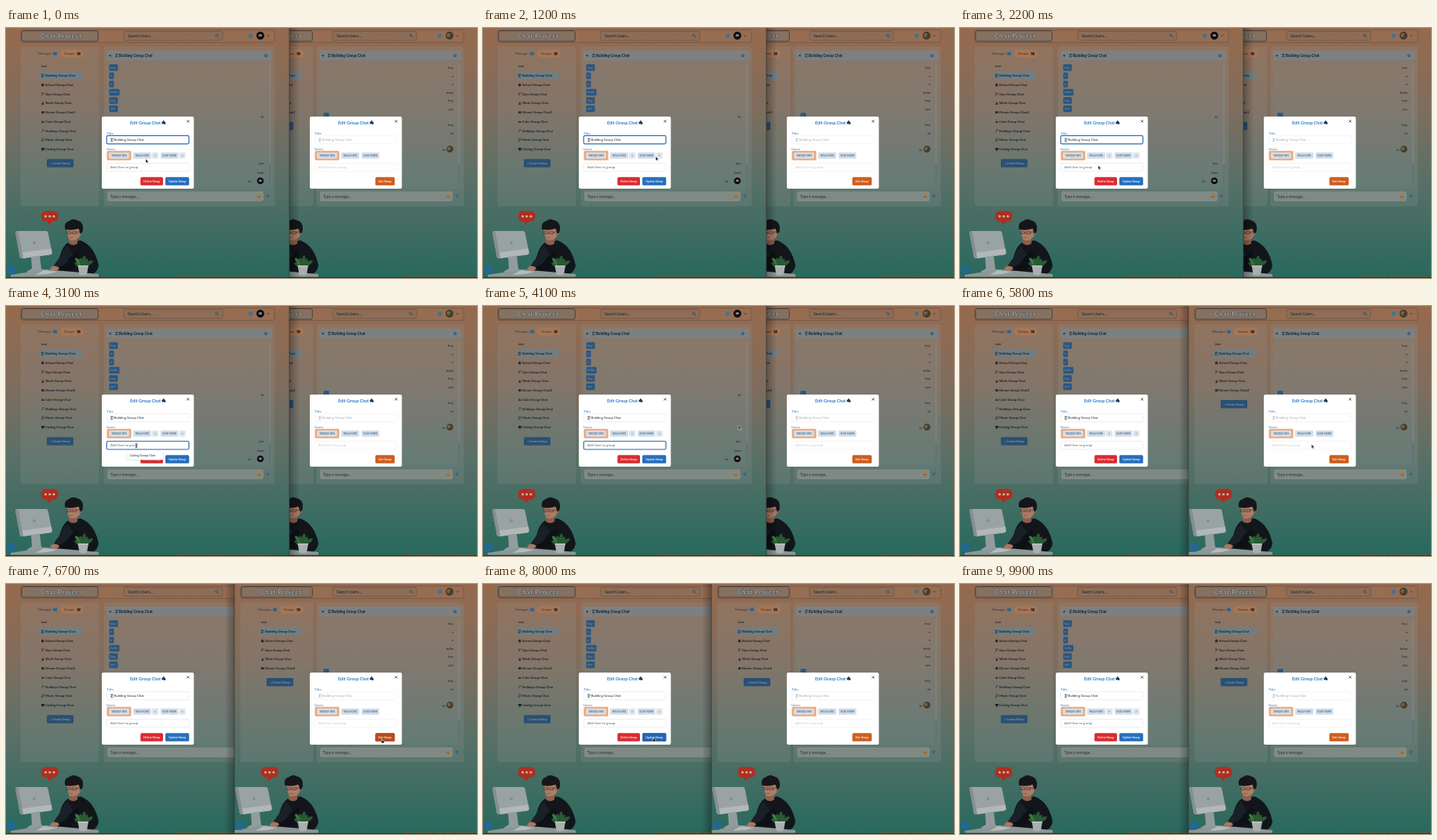
An HTML page that plays this animation: 600 px wide and 319 px high, repeating every 10 s.

```html
<!DOCTYPE html>
<html lang="en">
<head>
<meta charset="utf-8">
<title>Group chat demo</title>
<style>
html, body { margin: 0; width: 100%; height: 100%; overflow: hidden; background: #2b6a5c; }
#stage { position: relative; width: 600px; height: 319px; overflow: hidden; }
#stage > * { position: absolute; inset: 0; }
svg { display: block; width: 600px; height: 319px; }
text { font-family: Lato, "Open Sans", sans-serif; fill: #17212c; }
.b { font-weight: 700; }
.m { text-anchor: middle; }
.e { text-anchor: end; }

#right { clip-path: inset(0 0 0 361px); animation: front 10s step-end infinite; }
@keyframes front { 42% { clip-path: inset(0 0 0 291px); } }

.before, .after, .titleFocus, .addFocus, .popup, .exitHover, .updateHover,
.arrow, .beam, .hand, .denied { animation: 10s step-end infinite; }
.before { animation-name: before; }
.after { opacity: 0; animation-name: after; }
.titleFocus { animation-name: titleFocus; }
.addFocus, .popup { opacity: 0; animation-name: addFocus; }
.popup { animation-name: popup; }
.exitHover { opacity: 0; animation-name: exitHover; }
.updateHover { opacity: 0; animation-name: updateHover; }
.arrow { animation-name: arrow; }
.beam { opacity: 0; animation-name: beam; }
.hand { opacity: 0; animation-name: hand; }
.denied { opacity: 0; animation-name: denied; }
@keyframes before { 0% { opacity: 1; } 42%, 100% { opacity: 0; } }
@keyframes after { 0% { opacity: 0; } 42%, 100% { opacity: 1; } }
@keyframes titleFocus { 0% { opacity: 1; } 25%, 100% { opacity: 0; } }
@keyframes addFocus { 0% { opacity: 0; } 25% { opacity: 1; } 42%, 100% { opacity: 0; } }
@keyframes popup { 0% { opacity: 0; } 27% { opacity: 1; } 36%, 100% { opacity: 0; } }
@keyframes exitHover { 0% { opacity: 0; } 63% { opacity: 1; } 71%, 100% { opacity: 0; } }
@keyframes updateHover { 0% { opacity: 0; } 77% { opacity: 1; } 86%, 100% { opacity: 0; } }
@keyframes arrow {
  0% { opacity: 1; } 24% { opacity: 0; } 34% { opacity: 1; } 46% { opacity: 0; }
  52% { opacity: 1; } 63% { opacity: 0; } 71% { opacity: 1; } 77% { opacity: 0; }
  86% { opacity: 1; } 90%, 100% { opacity: 0; }
}
@keyframes beam { 0% { opacity: 0; } 24% { opacity: 1; } 34%, 100% { opacity: 0; } }
@keyframes denied { 0% { opacity: 0; } 46% { opacity: 1; } 52%, 100% { opacity: 0; } }
@keyframes hand {
  0% { opacity: 0; } 63% { opacity: 1; } 71% { opacity: 0; }
  77% { opacity: 1; } 86%, 100% { opacity: 0; }
}

#cursor { animation: travel 10s ease-in-out infinite; }
@keyframes travel {
  0%, 3% { transform: translate(178px, 167px); }
  10%, 15% { transform: translate(220px, 164px); }
  25%, 33% { transform: translate(166px, 178px); }
  46%, 50% { transform: translate(396px, 141px); }
  64%, 69% { transform: translate(479px, 198px); }
  78%, 84% { transform: translate(217px, 196px); }
  90%, 100% { transform: translate(222px, 222px); }
}
</style>
</head>
<body>
<div id="stage">
  <div id="left"></div>
  <div id="right"></div>
  <svg id="overlay" viewBox="0 0 600 319"></svg>
</div>
<script>
const rect = (x, y, w, h, fill, r = 0, more = '') =>
  `<rect x="${x}" y="${y}" width="${w}" height="${h}" rx="${r}" fill="${fill}" ${more}/>`;
const dot = (x, y, r, fill) => `<circle cx="${x}" cy="${y}" r="${r}" fill="${fill}"/>`;
const path = (d, fill, more = '') => `<path d="${d}" fill="${fill}" ${more}/>`;
const line = (d, color, w = .6) =>
  path(d, 'none', `stroke="${color}" stroke-width="${w}" stroke-linecap="round"`);
const text = (x, y, size, str, cls = '', fill = '') =>
  `<text x="${x}" y="${y}" font-size="${size}" class="${cls}"${fill && ` style="fill:${fill}"`}>${str}</text>`;
const group = (cls, ...parts) => `<g class="${cls}">${parts.join('')}</g>`;
const cross = (x, y, s, color, w) =>
  line(`M${x - s} ${y - s}l${2 * s} ${2 * s}m0 ${-2 * s}l${-2 * s} ${2 * s}`, color, w);

const crane = (x, y, color) =>
  line(`M${x} ${y + 1.7}h2.800M${x + .8} ${y + 1.7}v-3.400h2v1.600M${x + .2} ${y - 1.7}l.6 1.200`, color, .6);

const glyphs = [
  (x, y) => crane(x, y, '#151d28'),
  (x, y) => path(`M${x} ${y + 1.800}v-2.300l1.700-1.400 1.700 1.400v2.300z`, '#2b2829'),
  (x, y) => line(`M${x + .5} ${y - 1.5}l1.2 1.5-1 1.8M${x + 1.7} ${y}l1.6-1.6`, '#1c222b', .8),
  (x, y) => dot(x + 1.8, y - 1, 1, '#5c4431') + rect(x + .4, y, 2.9, 1.900, '#1b222c', .8),
  (x, y) => rect(x, y - 1.3, 3.6, 2.700, '#332723', .5),
  (x, y) => rect(x, y - .4, 3.6, 2, '#4a332c', .5) + rect(x + 1.5, y - 1.8, .6, 1.4, '#5a3a2a'),
  (x, y) => line(`M${x + .5} ${y + 1.6}l2-3M${x + 1.6} ${y - 1.6}l1.7 1`, '#353027', .7),
  (x, y) => line(`M${x + 1} ${y + 1.4}v-3l2-.4v3`, '#262b2d', .6) + dot(x + .6, y + 1.4, .7, '#262b2d'),
  (x, y) => rect(x, y - 1.5, 3.8, 2.500, '#131a22', .4) + rect(x + .8, y + 1.3, 2.2, .6, '#131a22')
];
const groupNames = ['Building', 'School', 'Gym', 'Work', 'Dinner', 'Cake', 'Holidays', 'Music', 'Coding'];

function deskScene(x) {
  const leaf = (a, len) =>
    `<ellipse cx="0" cy="${-len / 2}" rx="2.4" ry="${len / 2}" fill="${a % 20 ? '#2a5a33' : '#3f7741'}" transform="translate(98 305) rotate(${a})"/>`;
  return `<g transform="translate(${x})">` +
    // speech bubble
    rect(44.700, 233.500, 22, 13.500, '#ad2f21', 6) + path('M52 245.500l2.500 6 5-5z', '#ad2f21') +
    [50.5, 55.7, 60.900].map(d => dot(d, 240.300, 1.5, '#cbb2a8')).join('') +
    // body
    path('M68 316C65 300 69 280 79 274L95 271C108 276 115 288 118 303C116 314 108 316 98 316Z', '#12161b') +
    path('M78 278C71 282 70 292 65 297L61 303 66 308C75 306 82 300 86 290Z', '#1a2027') +
    path('M92 285C96 296 90 309 73 312L62 311 62 306C70 304 78 302 81 293Z', '#0d1116') +
    path('M80 267h11v8q-5 4-11 0z', '#8d5f4c') +
    // head
    path('M77.500 254Q88 247 95 254L94 266Q89 273 80.500 270Q77.500 263 77.500 254Z', '#ad7c67') +
    dot(94.5, 262, 2.2, '#a1705c') +
    path('M75.500 257Q73 249 80 246.500Q85 242 91 245.500Q100 248 97.500 260L95 263 92.500 256Q84 259 75.500 257Z', '#15161a') +
    line('M78 260h4.600v2.600h-4.300zM84.600 260h5v2.600h-4.600zM89.600 260.500l4-.4', '#2a2726', .6) +
    line('M81 267.300q2 .7 4 0', '#7a473c', .6) +
    // computer
    path('M12 261Q12 259 14 259L51 259Q53 259 53.500 261L58.500 286Q59 289 56 289.300L21 294Q18 294 17.500 291Z', '#9aa3a4') +
    path('M17 287L58 281.500 58.500 286Q59 289 56 289.300L21 294Q18 294 17.500 291Z', '#b2b7b7') +
    path('M12 261L17.500 291Q18 294 21 294L22 293.800 15.500 259.500Q13 258 12 261Z', '#858f90') +
    path('M32 292l11-1.500 2 17 9 3-18 3.500-10-3 7-4z', '#929c9d') +
    dot(36, 274, 2, '#838d8e') +
    path('M6 315L50 308 118 314V317.500H6Z', '#8d9797') +
    path('M48 309l18 2-13 3-15 1z', '#b6bbbb') +
    path('M59 304q7-1 9 3l-4 3q-6 0-8-3z', '#a87660') +
    // plant
    [-64, -40, -18, 8, 30, 58].map((a, i) => leaf(a, i % 2 ? 15 : 12)).join('') +
    path('M91.500 303h13.500l-2 11.500q-5 2-9.500 0z', '#a9afaf') +
    path('M91.500 303h13.500l-.3 1.800h-12.900z', '#bdc1c0') + '</g>';
}

function modal(x, owner) {
  const blue = '#2b7cc4', ink = owner ? '#202a36' : '#a6abb0';
  const edge = owner ? '#dce2e9' : '#eceff2';
  const chip = (cx, w, label) => rect(x + cx, 158.800, w, 8, '#d3dde7', 1.3) +
    text(x + cx + w / 2, 164, 3, label, 'b m', '#4d7193');
  const remove = cx => rect(x + cx, 158.800, 8.200, 8, '#dfe6ed', 1.3) +
    cross(x + cx + 4.100, 162.800, .7, '#68788a', .5);
  const button = (cx, w, color, label) => rect(x + cx, 190.300, w, 10.500, color, 1.600) +
    text(x + cx + w / 2, 196.800, 3.5, label, 'b m', '#f4f6f8');
  const hover = (cls, cx, w, color, label) => group(cls, button(cx, w, color, label));
  const field = (y, line) => rect(x + 6.300, y, 104.700, 10.500, '#fff', 1.5, `stroke="${line}" stroke-width=".6"`);
  const focus = (cls, y) => group(cls, rect(x + 6.300, y, 104.700, 10.500, 'none', 1.5,
    'stroke="#2f70b4" stroke-width="1.2"'));
  const navy = '#24364f';

  let out = rect(x, 113, 117.300, 92, '#fff', 2) +
    text(x + 36, 122.800, 5.5, 'Edit Group Chat', 'b', blue) +
    dot(x + 77.800, 121, 1.500, navy) + dot(x + 80, 121.500, 1.400, navy) + dot(x + 78.900, 119.400, 1.200, navy) +
    cross(x + 110, 119, 1.300, '#25303c', .7) +
    text(x + 6, 135.600, 4.5, 'Title', '', blue) + field(137.300, edge) +
    crane(x + 11.500, 142.600, ink) + text(x + 15.700, 144.100, 4.3, 'Building Group Chat', '', ink) +
    text(x + 6, 155.600, 4.5, 'Users', '', blue) +
    rect(x + 6.500, 156.800, 31, 12, '#f5a571', 1.5) + chip(9, 26, 'TARIQUE BEN') +
    chip(40, 23, 'NELA HURD') + chip(owner ? 75 : 66, 22.500, 'ELSIE MARN') +
    field(172.500, edge) + text(x + 11, 179.400, 4.4, 'Add User to group', '', owner ? '#5a636d' : '#c3c8cd');
  if (!owner) return out + button(83.500, 24.700, '#cf5d1c', 'Exit Group') +
    hover('exitHover', 83.500, 24.700, '#b84a20', 'Exit Group');
  return out + remove(64) + remove(98.500) +
    focus('titleFocus', 137.300) + focus('addFocus', 172.500) +
    button(49.300, 28.700, '#da2b30', 'Delete Group') + button(81, 30.300, '#266fbd', 'Update Group') +
    hover('updateHover', 81, 30.300, '#2466ae', 'Update Group') +
    group('popup', rect(x + 31.500, 186, 47, 10.500, '#c8ccd0', 1), rect(x + 32, 185.700, 46, 10.300, '#fff', 1),
      text(x + 35.500, 192.200, 3.9, 'Coding Group Chat', '', '#242b33'));
}

function page(p) {
  const { ox, sideW, panelL: L, panelR: R, searchL, searchR, rows, own } = p;
  const badge = (x, y, w, s) => rect(x, y - 4.200, w, 8.400, '#2a567f', 1.200) +
    text(x + 1.800, y + 1.400, 4, s, '', '#8a9aa8');
  const avatar = (x, y, r) => own
    ? dot(x, y, r, '#0c0f14') + dot(x, y + .3, r * .45, '#9b8078') + rect(x - r * .5, y + 1, r, r * .7, '#0c0f14', .6)
    : dot(x, y, r, '#3f3c2c') + dot(x - 1, y - .5, r * .5, '#7c6547') + dot(x + 1.5, y + 1, r * .4, '#5a392b');
  const frame = (x, y, w, h) => rect(x, y, w, h, '#8f9894', 2, 'fill-opacity=".2" stroke="#8b989a" stroke-opacity=".2" stroke-width=".6"');
  const end = R - 13.5;
  const tabInk = '#24364a';

  let s = rect(0, 0, 600, 319, `url(#bg${+own})`) +
    // top bar
    rect(ox + 19, 2.800, R - ox - 19, 15.500, '#a0765a', 2, 'fill-opacity=".3" stroke="#5f5045" stroke-width=".6"') +
    rect(ox + 19.8, 3.500, sideW - 1.500, 13.500, '#86705f', 2.5, 'stroke="#33383d" stroke-width=".8"') +
    `<text x="${ox + 44}" y="13" font-size="8" class="b" letter-spacing=".7" paint-order="stroke" stroke="#2a3a48" stroke-width=".7" style="fill:#a3b1b7">Chat Project</text>` +
    rect(searchL, 4.300, searchR - searchL, 11.400, '#8e6d57', 2, 'stroke="#5f4d42" stroke-width=".6"') +
    text(searchL + 5, 11.700, 5, 'Search Users...') +
    `<circle cx="${searchR - 7.500}" cy="9.300" r="1.500" fill="none" stroke="#2b4a66" stroke-width=".8"/>` +
    line(`M${searchR - 6.300} 10.600l1.500 1.500`, '#2b4a66', .9) +
    dot(R - 30.5, 9.700, 2.800, '#3f7494') + avatar(R - 18, 9.800, 5) +
    line(`M${R - 9.500} 9.200l1.300 1.300 1.300-1.300`, '#201f22') +
    // sidebar
    frame(ox + 19, 24, sideW, 203) +
    text(ox + 41, 34.300, 4, 'Messages', '', tabInk) + rect(ox + 60, 30.800, 5, 4, '#2c648f', 1) +
    rect(ox + 69, 27.500, 30, 10.300, '#a97552', 5) + text(ox + 74, 34.300, 4.2, 'Groups', '', tabInk) +
    dot(ox + 91.5, 32, 1.200, '#2d3540') + dot(ox + 93.800, 32, 1.200, '#2d3540') + rect(ox + 90.500, 33, 4.500, 1.600, '#2d3540', .8) +
    text(ox + 45, 50.300, 4.2, 'test', 'b') +
    rect(ox + 43, 55, 53, 11.300, '#668391', 1.5, 'opacity=".7"');
  groupNames.slice(0, rows).forEach((name, i) => {
    const y = 60.700 + i * 11.740;
    s += glyphs[i](ox + 45, y) + text(ox + 50, y + 1.500, 4.25, `${name} Group Chat${i == 4 ? 2 : ''}`, 'b');
  });
  const by = own ? 167.300 : 120;
  s += rect(ox + 52, by, 34, 10.500, '#2a5073', 1.500) +
    text(ox + 69, by + 6.600, 3.7, '+ Create Group', 'b m', '#8497a6') +
    // conversation
    frame(L, 24, R - L, 203) + rect(L + 3, 28.800, R - L - 6, 12.600, '#738894', 1.500, 'opacity=".65"') +
    path(`M${L + 6} 35.200l2.500-1.500v3z`, '#17263a') + crane(L + 14.500, 35, '#17212d') +
    text(L + 18.700, 36.800, 4.8, 'Building Group Chat', 'b') +
    dot(R - 11, 35.200, 2, '#34506a') + dot(R - 11, 35.200, .8, '#829097') +
    rect(L + 3, 43, R - L - 6, 162.500, '#758d93', 1, 'opacity=".14"');
  const log = [['hey', 11], ['x', 6], ['x', 6], ['hello', 13], ['hey', 11], ['yes', 11]];
  log.forEach(([word, w], i) => {
    const y = 50.500 + i * 10.500;
    s += own ? badge(131.5, y, w, word) : text(570, y + 1.500, 4.4, word, 'e');
  });
  if (own) {
    s += [['hi', 114], ['yes', 173], ['bam', 185]].map(([w, y]) => text(end, y + 1.300, 4.4, w, 'e')).join('') +
      text(312, 196.500, 4.4, 'hi', 'e') + avatar(324, 195, 4.300);
  } else {
    s += badge(404.500, 112.500, 7, 'x') + text(570, 125, 4.4, 'hey', 'e') + text(570, 136, 4.4, 'hi', 'e') +
      text(559.500, 156.500, 4.4, 'hi', 'e') + avatar(565.500, 154.500, 4.300);
  }
  s += rect(R - 6.700, 46, 1.600, 158, '#98a09c', .8, 'opacity=".3"') +
    rect(R - 6.700, 173, 1.600, 31, '#5d7075', .8) +
    rect(L + 4.500, 209, R - L - 19, 11.500, '#858e89', 1.500, 'stroke="#98a09b" stroke-width=".5" opacity=".85"') +
    text(L + 8, 216.500, 4.7, 'Type a message...', '', '#2b3033') +
    dot(R - 19.800, 214.800, 2.600, '#b9772c') + line(`M${R - 21.200} 215.300q1.400 1.800 2.800 0`, '#6d2f1f', .6) +
    path(`M${R - 11.500} 214l5-1.800-1.800 5-1.200-2z`, '#356288') +
    deskScene(ox);
  // lettering just showing at the bottom edge
  for (let x = p.x0 + 217; x < p.x0 + 340; x += 13) s += rect(x, 317.300, 9, 1.200, '#8a5436');
  // corner badge
  s += dot(p.x0 + 7, 308, 6, '#23688f');
  const bg = `<defs><linearGradient id="bg${+own}" x2="0" y2="1">
    <stop offset="0" stop-color="#966a4d"/><stop offset=".32" stop-color="#7f6d5e"/>
    <stop offset=".62" stop-color="#587067"/><stop offset="1" stop-color="#28695d"/></linearGradient></defs>`;
  return `<svg viewBox="0 0 600 319">${bg}${s}${modal(p.modalX, own)}</svg>`;
}

const get = id => document.getElementById(id);
get('left').innerHTML = page({
  own: true, x0: 0, ox: 0, sideW: 99, panelL: 125, panelR: 342, searchL: 150, searchR: 276, rows: 9, modalX: 122
});
get('right').innerHTML = page({
  own: false, x0: 291, ox: 280, sideW: 92, panelL: 396, panelR: 583, searchL: 416, searchR: 523, rows: 5, modalX: 387
});

const outline = 'stroke="#fff" stroke-width=".5" stroke-linejoin="round"';
const pointer = path('M0 0v5.200l1.200-1.100.9 1.900.9-.4-.8-1.800h1.700z', '#0b0d10', outline);
const shade = (x, w, from, to) => `<defs><linearGradient id="s${x}"><stop stop-color="#000" stop-opacity="${from}"/>
  <stop offset="1" stop-color="#000" stop-opacity="${to}"/></linearGradient></defs>` + rect(x, 0, w, 319, `url(#s${x})`);

get('overlay').innerHTML =
  group('before', shade(361, 13, .3, 0), rect(360.600, 0, .7, 319, '#33352f')) +
  group('after', shade(279, 12, 0, .3), rect(290.600, 0, .7, 319, '#33352f')) +
  rect(0, 318.300, 600, .7, '#16201e') +
  `<g id="cursor">` +
  group('arrow', pointer) +
  group('beam', line('M-1-2.500q1 0 1 .8v3.800q0 .8-1 .8M1-2.500q-1 0-1 .8m0 3.800q0 .8 1 .8', '#15191d', .7)) +
  group('hand', path('M-.5 0q.6-.6 1.100 0v1.800l1.800.5q.7.2.5 1l-.5 1.800h-2.500l-1.600-2q.2-.8 1.200-.2z', '#14171b', outline)) +
  group('denied', pointer, `<circle cx="1.800" cy="4.300" r="1.700" fill="#d5d8da" stroke="#4b4f54" stroke-width=".7"/>`,
    line('M.8 3.300l2 2', '#4b4f54', .6)) + '</g>';
</script>
</body>
</html>
```
